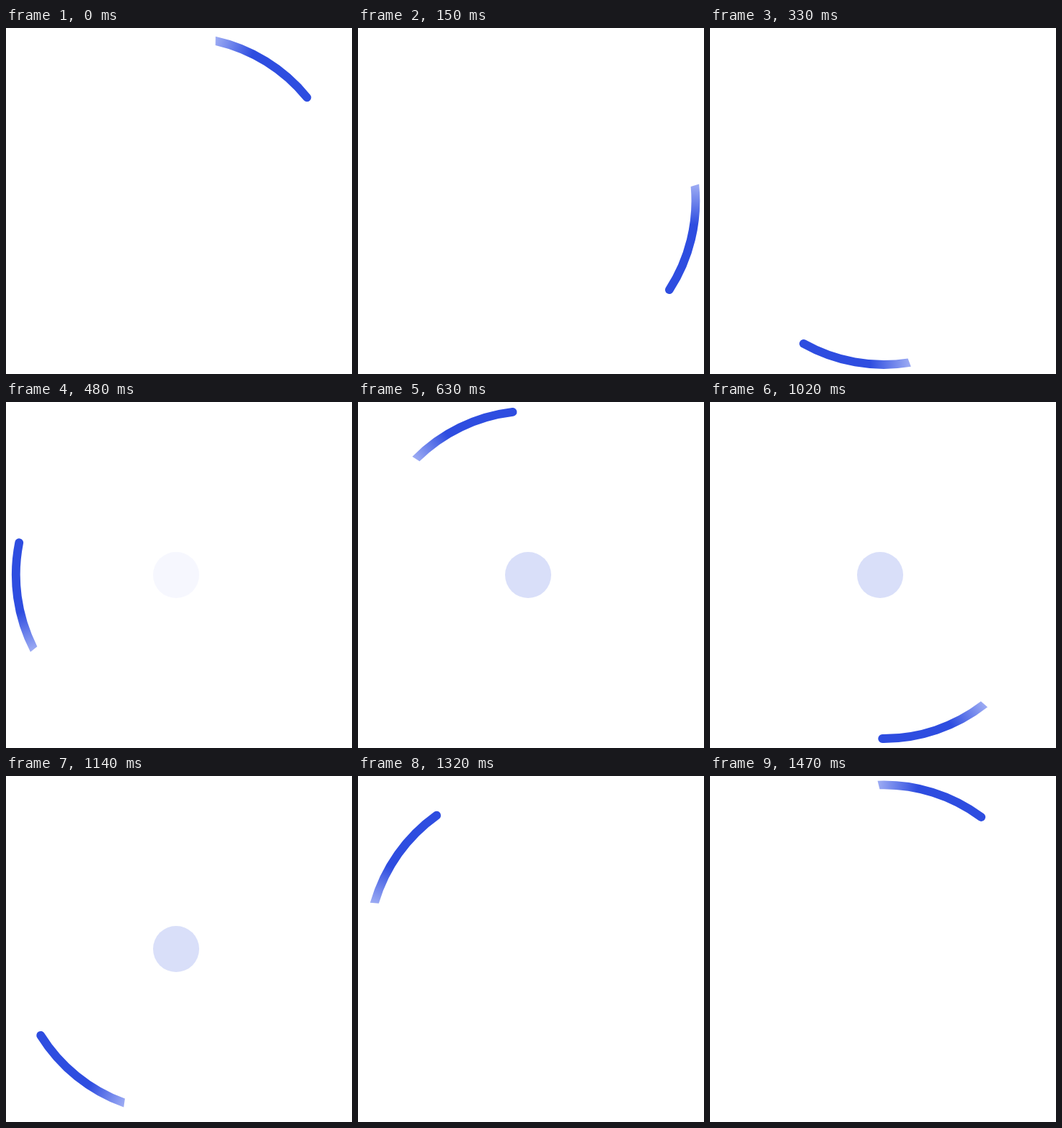
An HTML page with a canvas that plays this animation: 480 by 480 pixels, repeating every 1.5 s.

```html
<!DOCTYPE html>
<html lang="en">
<head>
<meta charset="utf-8">
<title>Loader</title>
<style>
  html, body { margin: 0; width: 480px; height: 480px; overflow: hidden; background: #fff; }
  canvas { display: block; }
</style>
</head>
<body>
<canvas id="stage" width="480" height="480"></canvas>
<script>
const ctx = document.getElementById('stage').getContext('2d');

const LOOP = 1500;
const STEP = 30;
const TURNS = 2;
const CENTER = { x: 241.1, y: 239.7 };
const RADIUS = 227.3;
const WIDTH = 11.8;
const START_ANGLE = -39.1;
const BLUE = '#2e4de0';
const PALE_BLUE = '#9baaf3';

const rad = degrees => degrees * Math.PI / 180;
const clamp = value => Math.min(1, Math.max(0, value));
const ramp = (t, from, to) => clamp((t - from) / (to - from));

// The arc is drawn with its head on the positive x axis.
function drawArc(angle) {
  const inner = RADIUS - WIDTH / 2;
  const outer = RADIUS + WIDTH / 2;
  const tail = rad(-38.3);
  const slant = rad(0.31);
  const solid = rad(-24.5);

  ctx.save();
  ctx.translate(CENTER.x, CENTER.y);
  ctx.rotate(rad(angle));

  const fade = ctx.createLinearGradient(
    RADIUS * Math.cos(tail), RADIUS * Math.sin(tail),
    RADIUS * Math.cos(solid), RADIUS * Math.sin(solid));
  fade.addColorStop(0, PALE_BLUE);
  fade.addColorStop(1, BLUE);

  ctx.beginPath();
  ctx.arc(0, 0, outer, tail - slant, 0);
  ctx.arc(RADIUS, 0, WIDTH / 2, 0, Math.PI);
  ctx.arc(0, 0, inner, 0, tail + slant, true);
  ctx.closePath();
  ctx.fillStyle = fade;
  ctx.fill();
  ctx.restore();
}

function drawDisc(t) {
  const alpha = ramp(t, 450, 570) * (1 - ramp(t, 1170, 1290));
  if (!alpha) return;
  ctx.save();
  ctx.globalAlpha = alpha;
  ctx.fillStyle = '#d9dff9';
  ctx.beginPath();
  ctx.arc(236, 240, 32, 0, 2 * Math.PI);
  ctx.fill();
  ctx.restore();
}

function render(now) {
  const t = Math.floor(now % LOOP / STEP) * STEP;
  ctx.fillStyle = '#fff';
  ctx.fillRect(0, 0, 480, 480);
  drawDisc(t);
  drawArc(START_ANGLE + 360 * TURNS * t / LOOP);
}

let start;
function tick(now) {
  start ??= now;
  render(now - start);
  requestAnimationFrame(tick);
}

render(0);
requestAnimationFrame(tick);
</script>
</body>
</html>
```
